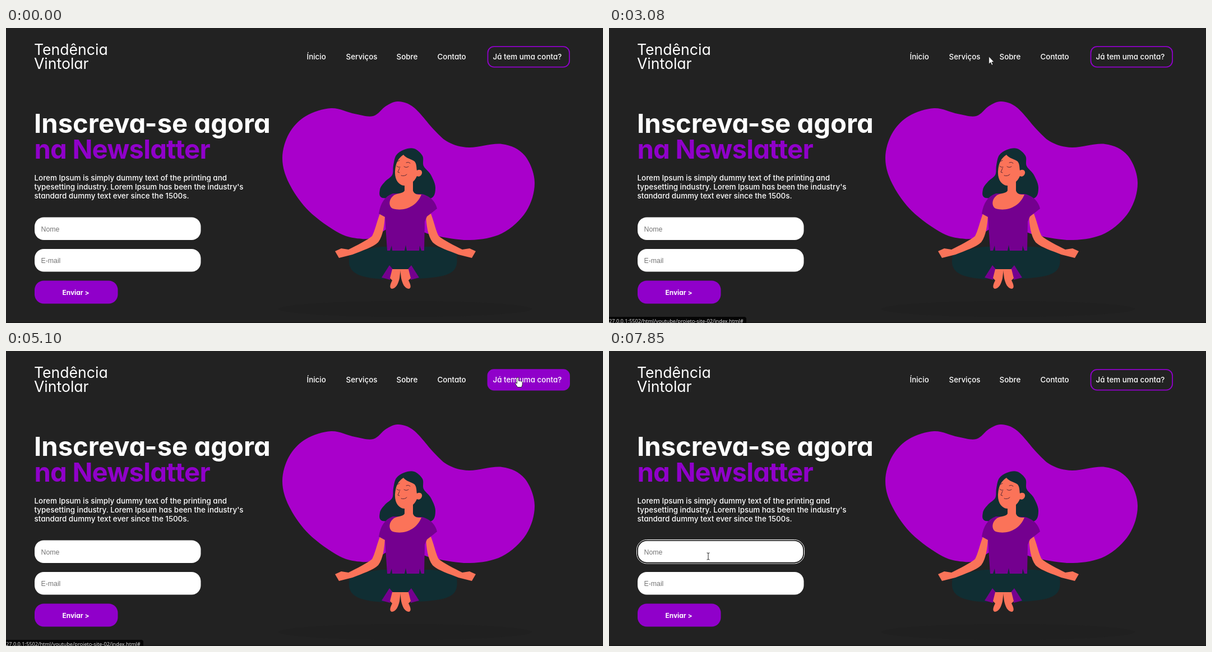
Recreate the animation shown at these times as an HTML page. Size 1065x526 px, loop 8000 ms.

```html
<!DOCTYPE html>
<html lang="pt">
<head>
<meta charset="utf-8">
<title>Newsletter</title>
<style>
  html, body { margin: 0; width: 100%; height: 100%; overflow: hidden; background: #222; }
  svg { display: block; width: 1065px; height: 526px; }
  text { font-family: Inter, Lato, sans-serif; font-feature-settings: "cv11"; fill: #fff; white-space: pre; }
  .logo { font-size: 26.6px; }
  .title { font-size: 47.2px; font-weight: 700; }
  .body, .nav { font-size: 13.4px; font-weight: 500; }
  .hint { font: 12.3px "Liberation Sans", Arial, sans-serif; fill: #757575; }
  .send { font-size: 11.9px; font-weight: 700; }
  .link { font: 9.2px "Open Sans", sans-serif; fill: #e8e8e8; }
  .skin { fill: #fb7359; }
  .dark { fill: #102e33; }
  .shirt { fill: #74008f; }
  .line { fill: none; stroke: #5b2a35; stroke-linecap: round; }
  .pointer { fill: #fff; stroke: #111; stroke-width: .8; stroke-linejoin: round; }
</style>
</head>
<body>
<svg viewBox="0 0 1065 526">
  <rect width="1065" height="526" fill="#222"/>
  <ellipse cx="712" cy="501" rx="226" ry="14" fill="#202020"/>
  <rect y="524" width="1065" height="2" fill="#1b1b1b"/>

  <g class="logo">
    <text x="50" y="48">Tendência</text>
    <text x="50" y="73">Vintolar</text>
  </g>

  <rect id="account" x="859.5" y="33.2" width="145.6" height="36.4" rx="11" stroke="#9000ca" stroke-width="1.8"/>
  <g class="nav">
    <text id="home" x="536.5" y="56">Ínicio</text>
    <text id="services" x="606.5" y="56">Serviços</text>
    <text id="about" x="696.5" y="56">Sobre</text>
    <text id="contact" x="769.5" y="56">Contato</text>
    <text x="868.5" y="56">Já tem uma conta?</text>
  </g>

  <g class="title">
    <text x="50" y="187">Inscreva-se agora</text>
    <text x="50.5" y="233" letter-spacing="-.8" style="fill:#9000ca">na Newslatter</text>
  </g>
  <g class="body">
    <text x="50.5" y="272">Lorem Ipsum is simply dummy text of the printing and</text>
    <text x="50.5" y="288">typesetting industry. Lorem Ipsum has been the industry's</text>
    <text x="50.5" y="304">standard dummy text ever since the 1500s.</text>
  </g>

  <rect id="name" x="51" y="337.5" width="296.5" height="40.5" rx="16.5" fill="#fff"/>
  <use href="#name" y="56.5"/>
  <rect x="51" y="450.5" width="148.5" height="41" rx="16.5" fill="#9000ca"/>
  <g id="focus" fill="none">
    <rect x="49.5" y="336.5" width="299" height="42.5" rx="18" stroke="#fff"/>
    <rect x="51" y="338" width="296" height="39.5" rx="16.5" stroke="#101010" stroke-width="1.6"/>
  </g>
  <text class="hint" x="62.5" y="362.5">Nome</text>
  <text class="hint" x="62.5" y="419">E-mail</text>
  <text class="send" x="100.5" y="476">Enviar &gt;</text>
  <rect id="caret" x="63" y="351" width="1" height="14"/>

  <path id="blob" fill="#a900cb"/>
  <path id="hair" class="dark"/>
  <path class="dark" d="M613 404C609 428 613 445 674 448L686 430H722L734 447C802 444 807 432 804 403C790 396 775 391 758 390H670C655 391 630 398 613 404Z"/>
  <path id="arm" class="skin" d="M667 331C661 347 658 362 653 371C645 378 625 388 611 395L598 393L587 398L594 410L618 404C635 397 655 391 664 382C673 370 675 350 676 335Z"/>
  <use href="#arm" transform="translate(1425) scale(-1 1)"/>
  <path class="shirt" d="M690 295C676 300 668 312 665 331L676 337L680 397H746L747 345L751 336L769 322C766 310 758 300 742 296Z"/>
  <path class="dark" d="M685 397L688 388L689 397ZM711 397L713 387L715 397ZM737 397L738 388L741 397Z"/>
  <path class="skin" d="M711 275V290C708 296 695 294 690 300C683 306 682 318 690 322C710 328 733 318 741 297C735 297 728 297 726 290V266Z"/>
  <path class="skin" d="M709 226C713 232 724 234 729 238C733 243 732 250 733 254C738 251 743 254 742 259C741 264 736 266 733 264C729 274 719 281 710 281C701 280 693 271 694 255C695 240 700 232 709 226Z"/>
  <path class="line" d="M697 246Q699 249 703 248M710 247Q714 250 718 247M698 238L702 236M714 240Q718 238 721 241M702 250L699 257L702 258M705 263Q711 265 715 261"/>
  <g id="foot">
    <path class="shirt" d="M684 423L690 430L685 449L670 445Z"/>
    <path class="skin" d="M689 430H704L702 446C700 455 696 465 688 465C683 463 686 456 689 450L685 446Z"/>
  </g>
  <use href="#foot" transform="translate(1407) scale(-1 1)"/>

  <g id="status">
    <path d="M0 515H241Q245 515 245 519V526H0Z" fill="#050505"/>
    <text class="link" x="-5.3" y="526.3">127.0.0.1:5502/html/youtube/projeto-site-02/index.html#</text>
  </g>

  <g id="cursor">
    <path id="arrow" class="pointer" d="M0 0V13.5L3 10.7L5.2 15.5L7.3 14.6L5.2 10H9.3Z"/>
    <path id="hand" class="pointer" d="M-1.5 1.3Q-1.5 0 0 0T1.5 1.3V6.2Q8 6 8.2 9V12.5Q8 15 6.5 17.5H-.3Q-3 14 -4.5 10.8Q-4.5 8.5 -1.5 11Z"/>
    <path id="beam" fill="none" stroke="#222" d="M-2.5 -6H-.8L0 -5L.8 -6H2.5M0 -5V5M-2.5 6H-.8L0 5L.8 6H2.5"/>
  </g>
</svg>
<script>
  const LOOP = 8000, FADE = 300;
  const get = id => document.getElementById(id);
  const clamp = v => Math.min(1, Math.max(0, v));
  const ramp = (t, from, to) => clamp((t - from) / (to - from));
  const show = (id, on) => get(id).setAttribute('opacity', Number(on));

  // Closed smooth curve through "x,y x,y ..."
  function smooth(id, list) {
    const pts = list.split(' ').map(p => p.split(',').map(Number));
    const at = i => pts[(i + pts.length) % pts.length];
    const lean = (i, side) => at(i).map((v, k) => v + side * (at(i + 1)[k] - at(i - 1)[k]) / 6);
    const curves = pts.map((_, i) => `C${lean(i, 1)} ${lean(i + 1, -1)} ${at(i + 1)}`);
    get(id).setAttribute('d', `M${at(0)}${curves.join('')}Z`);
  }
  smooth('blob', '493,232 505,188 535,157 580,143 622,153 655,157 678,139 700,131 728,142 765,183 ' +
    '790,204 826,213 885,207 925,227 943,275 928,327 885,366 828,378 765,370 700,352 657,372 635,376 595,366 540,326 505,277');
  smooth('hair', '710,217 728,215 743,228 745,246 758,262 766,285 757,304 715,300 672,303 667,288 676,274 689,262 691,245 696,227');

  // Moves: start, end, goal x, goal y, ease-out power
  const START = [1010, 512], APPEAR = 660;
  const moves = [
    [APPEAR, 1460, 575, 96, 2],
    [1540, 1660, 559, 20, 1],
    [1660, 2100, 565, 53, 1],
    [2480, 3280, 715, 50, 1],
    [3630, 3870, 800, 49, 1],
    [4580, 5000, 913, 47, 1],
    [5920, 6720, 198, 338, 2],
    [6780, 7070, 177, 366, 2],
  ];
  function pointer(t) {
    let [x, y] = START;
    for (const [from, to, gx, gy, power] of moves) {
      const p = 1 - (1 - ramp(t, from, to)) ** power;
      x += (gx - x) * p;
      y += (gy - y) * p;
    }
    return [x, y];
  }

  const boxes = {};
  function inside(id, t) {
    const b = boxes[id] ??= get(id).getBBox();
    const [x, y] = pointer(t);
    return x >= b.x && x <= b.x + b.width && y >= b.y && y <= b.y + b.height;
  }

  // How far a hover has faded in, 0 to 1; it drops at once on leaving
  function glow(id, t) {
    let held = 0;
    while (held < FADE && inside(id, t - held)) held += 5;
    return Math.sin(held / FADE * Math.PI / 2) ** 1.5;
  }

  const bases = { home: '#fff', services: '#fff', about: '#fff', contact: '#fff', account: '#222' };

  function draw(now) {
    const t = now % LOOP;
    let hovering = false;
    for (const id in bases) {
      const amount = glow(id, t);
      hovering ||= amount > 0;
      get(id).style.fill = `color-mix(in srgb, #9000ca ${amount * 100}%, ${bases[id]})`;
    }
    const typing = inside('name', t);
    show('hand', hovering);
    show('beam', typing);
    show('arrow', !hovering && !typing);
    show('cursor', t >= APPEAR);
    get('cursor').setAttribute('transform', `translate(${pointer(t)})`);
    show('status', ramp(t, 2000, 2120) - ramp(t, 6400, 6600));
    show('focus', t >= 7320);
    show('caret', t >= 7350 && t < 7850);
    requestAnimationFrame(draw);
  }
  draw(performance.now());
</script>
</body>
</html>
```
